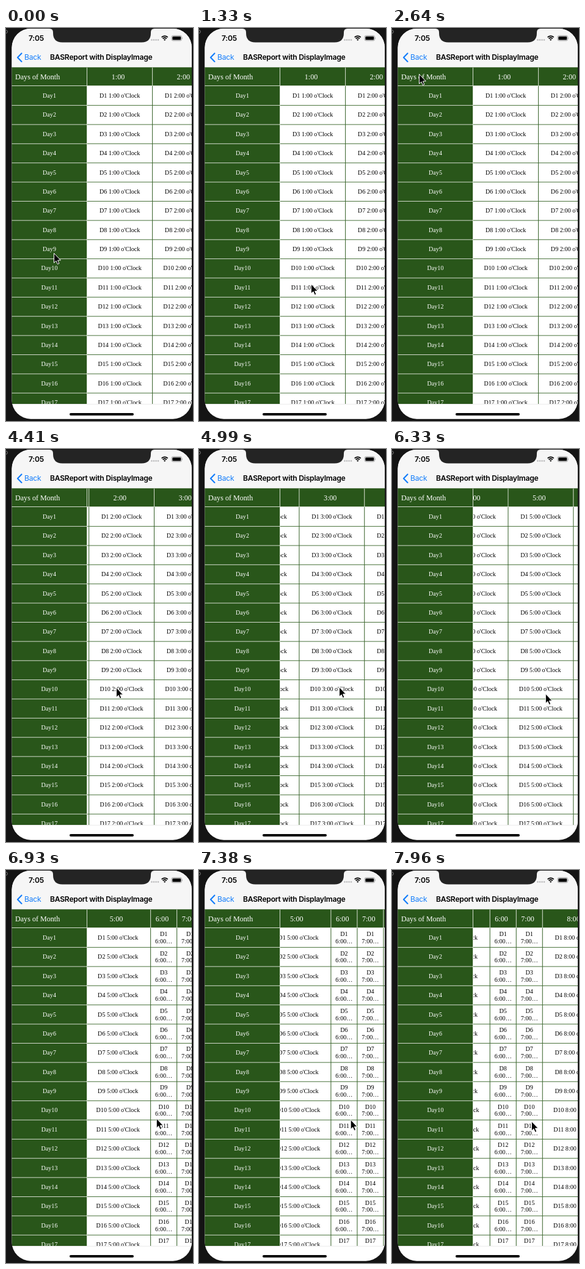
An HTML page that plays this animation: 306 px wide and 643 px high, repeating every 8 s.

```html
<!DOCTYPE html>
<html lang="en">
<head>
<meta charset="utf-8">
<title>Report table</title>
<style>
  html, body { margin: 0; width: 100%; height: 100%; overflow: hidden; background: #141414; }
  svg { display: block; width: 306px; height: 643px; }
  .ui { font-family: Inter, "Liberation Sans", sans-serif; font-size: 12.2px; letter-spacing: -0.28px; }
  .bold { font-weight: 600; }
  .table { font-family: "Liberation Serif", "Times New Roman", serif; font-size: 10.1px; text-anchor: middle; }
  .head { font-size: 12.1px; }
  .light { fill: #fff; }
</style>
</head>
<body>
<svg viewBox="0 0 306 643" xmlns="http://www.w3.org/2000/svg">
  <defs>
    <clipPath id="screen"><rect x="9.5" y="1" width="294.5" height="638.7" rx="31"/></clipPath>
    <clipPath id="body"><rect x="133" y="64" width="171" height="551"/></clipPath>
    <clipPath id="tableArea"><rect x="9" y="64" width="295" height="551"/></clipPath>
  </defs>
  <rect width="306" height="643" fill="#141414"/>
  <path d="M0 3.5Q2.5 3.5 2.5 6T0 8.5" fill="none" stroke="#777"/>
  <g clip-path="url(#screen)">
    <rect width="306" height="643" fill="#fff"/>
    <rect width="306" height="64" fill="#f6f6f6"/>

    <!-- status bar -->
    <path d="M71 0V1Q77 1 77 7V8Q77 23.5 92 23.5H222Q237 23.5 237 8V7Q237 1 243 1V0Z" fill="#242424"/>
    <text class="ui bold" x="37" y="21.2">7:05</text>
    <g fill="#b9b9bb">
      <circle cx="238.5" cy="19.5" r="1.3"/><circle cx="242" cy="19.5" r="1.3"/>
      <circle cx="245.5" cy="19.5" r="1.3"/><circle cx="249" cy="19.5" r="1.3"/>
    </g>
    <g fill="none" stroke="#000" stroke-width="1.7">
      <path d="M254.6 15.2Q259.7 10.9 264.8 15.2"/>
      <path d="M256.5 17.4Q259.7 14.6 262.9 17.4"/>
    </g>
    <path d="M257.9 18.9Q259.7 17.4 261.5 18.9L259.7 20.8Z"/>
    <rect x="271" y="12.4" width="16.5" height="8.4" rx="2.4" fill="none" stroke="#8e8e90" stroke-width=".8"/>
    <rect x="272.3" y="13.7" width="13.9" height="5.8" rx="1.3"/>
    <path d="M288.5 15.2Q290 16.6 288.5 18Z" fill="#8e8e90"/>

    <!-- navigation bar -->
    <path d="M25.5 41.5L19 48.2L25.5 54.9" fill="none" stroke="#157efb" stroke-width="2.2" stroke-linecap="round" stroke-linejoin="round"/>
    <text class="ui" x="30" y="52.4" fill="#157efb">Back</text>
    <text class="ui bold" x="72" y="52.4">BASReport with DisplayImage</text>

    <g class="table" clip-path="url(#tableArea)">
      <g clip-path="url(#body)"><g id="columns"></g></g>
      <g id="days"></g>
    </g>
    <path d="M9 615.5H304" stroke="#ddd" stroke-width=".6"/>
    <rect x="104" y="630" width="105" height="4" rx="2"/>
  </g>
  <path id="cursor" d="M.5 .5V16.2L4 12.9L6.4 18.4L8.9 17.3L6.6 12H11.4Z" fill="#000" stroke="#fff" stroke-linejoin="round"/>
</svg>
<script>
const LOOP = 8000, STEP = 147;
const ROWS = 17, ROW_H = 31.38, TOP = 95, LEFT = 132.8;
const WIDE = 106.8, NARROW = 43, GREEN = '#29561a', PALE = '#d3dccd';
const $ = id => document.getElementById(id);

function add(parent, tag, attrs, text) {
  const el = document.createElementNS('http://www.w3.org/2000/svg', tag);
  for (const key in attrs) el.setAttribute(key, attrs[key]);
  if (text) el.textContent = text;
  parent.append(el);
}
const label = (parent, x, y, text, cls = '') => add(parent, 'text', { x, y, class: cls }, text);
const line = (parent, d, stroke) => add(parent, 'path', { d, stroke });
const box = (parent, x, y, width, height, fill) => add(parent, 'rect', { x, y, width, height, fill });
const rowTop = i => TOP + i * ROW_H;

function drawColumn(hour, x, width) {
  const g = $('columns'), mid = x + width / 2, right = x + width, time = hour + ':00';
  box(g, x, 64, width, 31, GREEN);
  box(g, x, TOP, width, 520, '#fff');
  for (let i = 0; i < ROWS; i++) {
    const y = rowTop(i), day = 'D' + (i + 1);
    if (i) line(g, `M${x} ${y + .2}h${width}`, '#47713a');
    if (width === NARROW) {
      label(g, mid, y + 13.2, day);
      label(g, mid, y + 25, time + '…');
    } else {
      label(g, mid, y + 19, `${day} ${time} o'Clock`);
    }
  }
  line(g, `M${x} 94.5h${width}`, PALE);
  line(g, `M${right} 64V94`, PALE);
  line(g, `M${right} 95V615`, '#335f25');
  label(g, mid - 2.7, 83.7, time, 'head light');
}

function drawDays() {
  const g = $('days');
  box(g, 9, 64, 124, 551, GREEN);
  for (let i = 0; i < ROWS; i++) {
    line(g, `M9 ${rowTop(i) + (i ? .2 : -.5)}H133`, PALE);
    label(g, 71, rowTop(i) + 19, 'Day' + (i + 1), 'light');
  }
  line(g, 'M132.5 64V615', PALE);
  line(g, 'M9 64.3H304', '#7c9572');
  add(g, 'text', { x: 15, y: 83.7, class: 'head light', style: 'text-anchor:start' }, 'Days of Month');
}

// Draw right to left so that each column's right border stays on top.
for (let hour = 8, x = LEFT + 6 * WIDE + 2 * NARROW; hour >= 1; hour--) {
  const width = hour === 6 || hour === 7 ? NARROW : WIDE;
  x -= width;
  drawColumn(hour, x, width);
}
drawDays();

// Key points of the hand: time, x, y.
const hand = [
  [0, 78, 368], [440, 230, 431], [880, 230, 431], [1180, 215, 446], [1470, 150, 390],
  [2060, 85, 175], [2640, 44, 75], [3240, 44, 75], [3675, 235, 391], [3830, 235, 391],
  [5000, 229, 389], [5735, 253, 394], [6910, 256, 406], [LOOP, 240, 411]
];
// Swipes: start time and pulled distance.
const swipes = [[3834, 65.4], [5143, 66.7], [6172, 30.9], [7240, 29.3]];
const PULL_MS = 430, GLIDE_MS = 500;

const clamp = u => Math.min(1, Math.max(0, u));
const smooth = u => u * u * (3 - 2 * u);

function handAt(t) {
  const i = hand.findIndex(p => p[0] > t);
  const [t0, x0, y0] = hand[i - 1], [t1, x1, y1] = hand[i];
  const u = (t - t0) / (t1 - t0);
  return [x0 + (x1 - x0) * u, y0 + (y1 - y0) * u];
}

// The pull speeds up evenly; the glide keeps its final speed and decays until the next touch.
function swipeAt(t) {
  let scroll = 0, lag = 0;
  swipes.forEach(([start, pull], i) => {
    if (t < start) return;
    const next = swipes[i + 1]?.[0] ?? LOOP;
    const pulled = pull * clamp((t - start) / PULL_MS) ** 2;
    const free = Math.max(0, Math.min(t, next) - start - PULL_MS);
    const glide = 2 * pull * GLIDE_MS / PULL_MS * (1 - Math.exp(-free / GLIDE_MS));
    scroll += pulled + glide;
    lag = pulled * (1 - smooth(clamp(free / GLIDE_MS)));
  });
  return [scroll, lag];
}

function draw() {
  const now = performance.now() % LOOP;
  const t = Math.floor((now + 10) / STEP) * STEP;
  const [x, y] = handAt(t), [scroll, lag] = swipeAt(t);
  $('columns').setAttribute('transform', `translate(${-scroll} 0)`);
  $('cursor').setAttribute('transform', `translate(${x - lag} ${y})`);
  requestAnimationFrame(draw);
}
draw();
</script>
</body>
</html>
```
